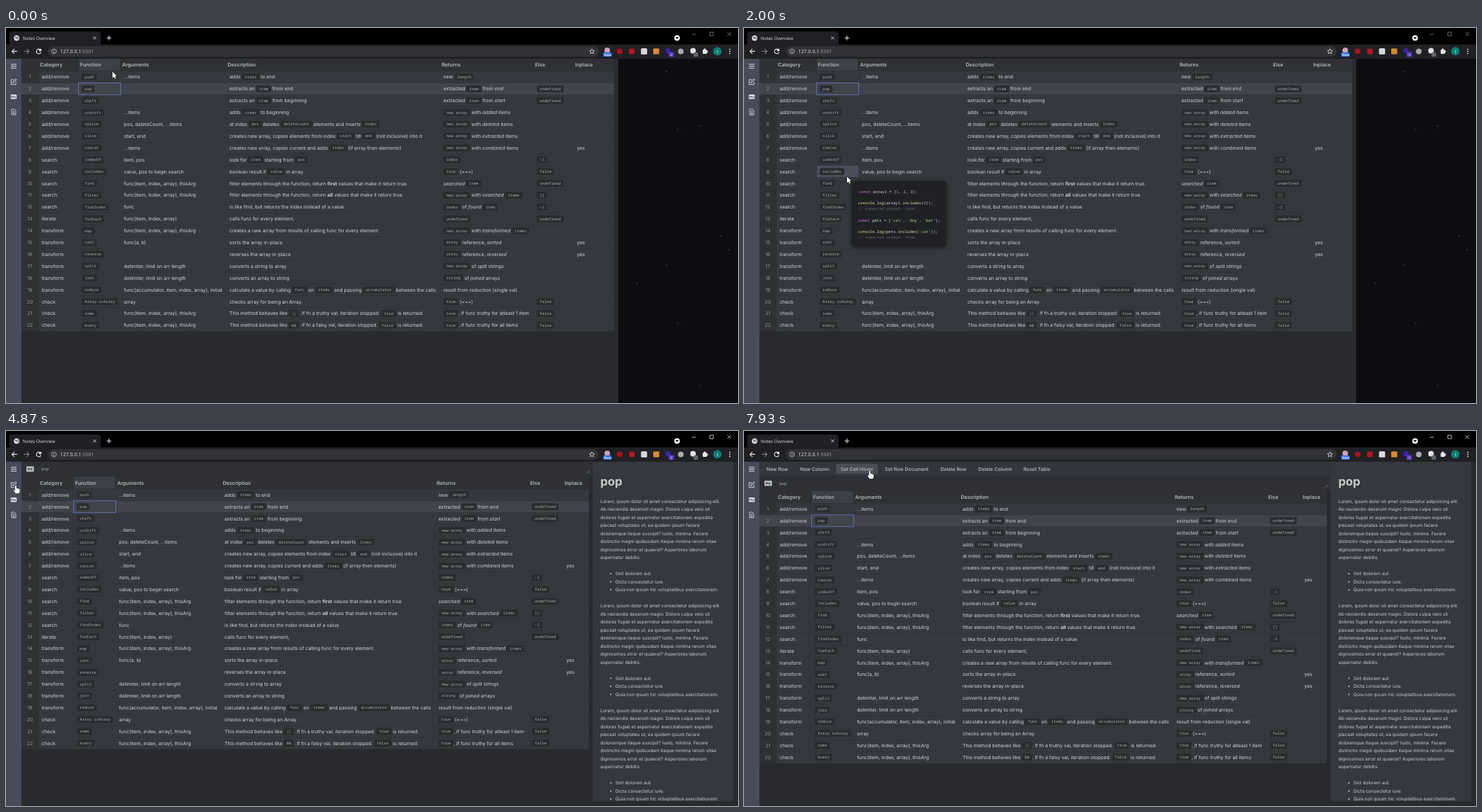
An HTML page with a canvas for the animation above (8 s loop, 1045 by 536 pixels).

```html
<!DOCTYPE html>
<html lang="en">
<head>
<meta charset="utf-8">
<title>Notes Overview</title>
<style>
html, body { margin: 0; width: 100%; height: 100%; overflow: hidden; background: #000; }
canvas { display: block; width: 1045px; height: 536px; }
</style>
</head>
<body>
<canvas id="stage" width="1045" height="536"></canvas>
<script>
const ctx = document.getElementById('stage').getContext('2d');
const LOOP = 8000, FPS = 15, ROW = 16.9, TOP = 44;
const UI = 'Inter, sans-serif', MONO = '"Noto Sans Mono", monospace', BAR = '"Open Sans", sans-serif';
const SIZE = 6.89, CODE = 5.58;

const HEADS = ['Category', 'Function', 'Arguments', 'Description', 'Returns', 'Else', 'Inplace'];
const COLS = [51, 108.3, 168.3, 319, 624.5, 757.8, 815];
// ~chip~  _italic_  *bold*
const ROWS = `add/remove;~push~;...items;adds ~items~ to end;new ~length~
add/remove;~pop~;;extracts an ~item~ from end;extracted ~item~ from _end_;~undefined~
add/remove;~shift~;;extracts an ~item~ from beginning;extracted ~item~ from _start_;~undefined~
add/remove;~unshift~;...items;adds ~items~ to beginning;~new array~ with _added_ items
add/remove;~splice~;pos, deleteCount, ...items;at index ~pos~ deletes ~deleteCount~ elements and inserts ~items~;~new array~ with _deleted_ items
add/remove;~slice~;start, end;creates new array, copies elements from index ~start~ till ~end~ (not inclusive) into it;~new array~ with _extracted_ items
add/remove;~concat~;...items;creates new array, copies current and adds ~items~ (if array then elements);~new array~ with _combined_ items;;yes
search;~indexOf~;item, pos;look for ~item~ starting from ~pos~;~index~;~-1~
search;~includes~;value, pos to begin search;boolean result if ~value~ in array;~true~ (===);~false~
search;~find~;func(item, index, array), thisArg;filter elements through the function, return *first* values that make it return true.;_searched_ ~item~;~undefined~
search;~filter~;func(item, index, array), thisArg;filter elements through the function, return *all* values that make it return true.;~new array~ with _searched_ ~items~;~[]~
search;~findIndex~;func;is like find, but returns the index instead of a value.;~index~ of _found_ ~item~;~-1~
iterate;~forEach~;func(item, index, array);calls func for every element,;~undefined~;~undefined~
transform;~map~;func(item, index, array), thisArg;creates a new array from results of calling func for every element.;~new array~ with _transformed_ ~items~
transform;~sort~;func(a, b);sorts the array in-place;~array~ reference, _sorted_;;yes
transform;~reverse~;;reverses the array in-place;~array~ reference, _reversed_;;yes
transform;~split~;delimiter, limit on arr length;converts a string to array;~new array~ of _split_ strings
transform;~join~;delimiter, limit on arr length;converts an array to string;~string~ of _joined_ arrays
transform;~reduce~;func(accumulator, item, index, array), initial;calculate a value by calling ~func~ on ~items~ and passing ~accumulator~ between the calls;result from reduction (single val)
check;~Array.isArray~;array;checks array for being an Array.;~true~ (===);~false~
check;~some~;func(item, index, array), thisArg;This method behaves like ~||~. If fn a truthy val, iteration stopped. ~true~ is returned.;~true~, if func truthy for atleast 1 item;~false~
check;~every~;func(item, index, array), thisArg;This method behaves like ~&&~. If fn a falsy val, iteration stopped. ~false~ is returned.;~true~, if func truthy for all items;~false~`
  .split('\n').map(r => r.split(';'));

const EXAMPLES = `const animals = ['pigs', 'goats', 'sheep'];

const count = animals.push('cows');
console.log(count);
// expected output: 4
#const plants = ['broccoli', 'cauliflower', 'cabbage', 'kale', 'tomato'];

console.log(plants.pop());
// expected output: "tomato"

console.log(plants);
// expected output: array ["broccoli", "cauliflower", "cabbage", "kale"]
#const array1 = [1, 2, 3];

const firstElement = array1.shift();

console.log(array1);
// expected output: Array [2, 3]

console.log(firstElement);
// expected output: 1
#const array1 = [1, 2, 3];

console.log(array1.unshift(4, 5));
// expected output: 5

console.log(array1);
// expected output: Array [4, 5, 1, 2, 3]
#const months = ['Jan', 'March', 'April', 'June'];
months.splice(1, 0, 'Feb');
// inserts at index 1
console.log(months);
// expected output: Array ["Jan", "Feb", "March", "April", "June"]

months.splice(4, 1, 'May');
// replaces 1 element at index 4
console.log(months);
// expected output: Array ["Jan", "Feb", "March", "April", "May"]
#const animals = ['ant', 'bison', 'camel', 'duck', 'elephant'];

console.log(animals.slice(2));
// expected output: Array ["camel", "duck", "elephant"]

console.log(animals.slice(2, 4));
// expected output: Array ["camel", "duck"]

console.log(animals.slice(1, 5));
// expected output: Array ["bison", "camel", "duck", "elephant"]

console.log(animals.slice(-2));
// expected output: Array ["duck", "elephant"]
#const array1 = ['a', 'b', 'c'];
const array2 = ['d', 'e', 'f'];
const array3 = array1.concat(array2);

console.log(array3);
// expected output: Array ["a", "b", "c", "d", "e", "f"]
#const beasts = ['ant', 'bison', 'camel', 'duck', 'bison'];

console.log(beasts.indexOf('bison'));
// expected output: 1

// start from index 2
console.log(beasts.indexOf('bison', 2));
// expected output: 4

console.log(beasts.indexOf('giraffe'));
// expected output: -1
#const array1 = [1, 2, 3];

console.log(array1.includes(2));
// expected output: true

const pets = ['cat', 'dog', 'bat'];

console.log(pets.includes('cat'));
// expected output: true`.split('\n#').map(s => s.split('\n'));

const LOREM = `Lorem, ipsum dolor sit amet consectetur adipisicing elit.
Ab reiciendis deserunt magni. Dolore culpa vero sit
dolores fugiat et aspernatur exercitationem expedita
placeat voluptates ut, ea quidem ipsum facere
doloremque itaque suscipit? Iusto, minima. Facere
distinctio magni quibusdam itaque minima rerum vitae
dignissimos error et quaerat? Asperiores laborum
aspernatur debitis.`.split('\n');
const LIST = ['Sint dolorem aut.', 'Dicta consectetur iure.', 'Quia non ipsum hic voluptatibus exercitationem.'];

const BUTTONS = [['New Row', 32], ['New Column', 80], ['Set Cell Hover', 138], ['Set Row Document', 201],
  ['Delete Row', 280.5], ['Delete Column', 334.5], ['Reset Table', 399]];

// pointer path: step (1/15 s), x, y
const PATH = [[-1, 153, 55], [0, 152, 62.5], [1, 151, 68], [4, 145, 87], [13, 145, 87], [17, 139, 130], [22, 143, 161],
  [25, 146, 177], [26, 146, 188], [27, 146, 189], [29, 147, 211], [30, 147, 212.5], [33, 143, 207], [38, 143, 207],
  [41, 125, 191], [45, 60, 150], [49, 16.5, 127], [51, 16, 124], [57, 16, 124], [63, 11, 101], [66, 11, 98],
  [70, 14, 81], [73, 14, 78], [82, 14, 78], [88, 95, 122], [89, 121, 124], [90, 122, 124.5], [95, 131, 128],
  [97, 131, 128], [104, 75, 75], [110, 55, 56], [111, 55, 56], [119, 179.5, 57]];
const FOCUS_AT = 52, PANEL_AT = 53, EDITOR_AT = 65, TOOLS_AT = 75;

const STARS = [[943, 62], [990, 140], [959, 145], [1021, 297], [1032, 317], [943, 339], [901, 365], [959, 422], [990, 511]];

function box(x, y, w, h, color, r = 0) {
  ctx.fillStyle = color;
  ctx.beginPath();
  ctx.roundRect(x, y, w, h, r);
  ctx.fill();
}
function dot(x, y, r, color) {
  ctx.fillStyle = color;
  ctx.beginPath();
  ctx.arc(x, y, r, 0, 7);
  ctx.fill();
}
// polylines from "x,y x,y / x,y x,y"
function lines(spec, x, y, color, width = 1) {
  ctx.strokeStyle = color;
  ctx.lineWidth = width;
  ctx.beginPath();
  for (const part of spec.split('/')) {
    part.trim().split(' ').forEach((p, i) => {
      const [a, b] = p.split(',').map(Number);
      ctx[i ? 'lineTo' : 'moveTo'](x + a, y + b);
    });
  }
  ctx.stroke();
}
function text(s, x, y, color, font) {
  ctx.font = font;
  ctx.fillStyle = color;
  ctx.fillText(s, x, y);
  return ctx.measureText(s).width;
}

function rich(s, x, y) {
  for (const part of s.split(/(~[^~]+~|_[^_]+_|\*[^*]+\*)/)) {
    if (!part) continue;
    const body = part.slice(1, -1);
    if (part[0] === '~') {
      ctx.font = `${CODE}px ${MONO}`;
      const w = ctx.measureText(body).width + 8;
      box(x, y - 4.9, w, 9.8, '#2a2c30', 1.6);
      text(body, x + 4, y + 1.9, '#a6a9ae', ctx.font);
      x += w;
    } else {
      const style = part[0] === '_' ? 'italic ' : part[0] === '*' ? 'bold ' : '';
      x += text(style ? body : part, x, y + 2.5, '#d2d4d7', `${style}${SIZE}px ${UI}`);
    }
  }
}

function pointer(f) {
  let i = 1;
  while (i < PATH.length - 1 && PATH[i][0] < f) i++;
  const [a, b] = [PATH[i - 1], PATH[i]];
  const k = Math.min(1, Math.max(0, (f - a[0]) / (b[0] - a[0])));
  return [a[1] + (b[1] - a[1]) * k, a[2] + (b[2] - a[2]) * k];
}

function layout(f) {
  const panel = f >= PANEL_AT;
  return {
    panel, editor: f >= EDITOR_AT, tools: f >= TOOLS_AT,
    dy: f >= TOOLS_AT ? 41.4 : f >= EDITOR_AT ? 21.3 : 0,
    right: panel ? 832 : 868,
    shift: c => !panel || !c ? 0 : c === 6 ? -15 : -7
  };
}

// row under the slightly delayed pointer, within the Function column
function hovered(f) {
  const [x, y] = pointer(f - 0.25), L = layout(f), left = 103.5 + L.shift(1);
  const row = Math.floor((y - 61.5 - L.dy) / ROW);
  return x > left && x < left + 60.5 && row >= 0 && row < ROWS.length ? row : -1;
}

function table(L, hover) {
  const top = TOP + L.dy, first = top + 17.5, fx = 103.5 + L.shift(1);
  box(22, top, L.right - 22, 17.5, '#2f3136');
  box(fx + 0.5, top, 58.5, 17.5, '#3b3f46');
  HEADS.forEach((h, c) =>
    text(h, COLS[c] - 2.6 + L.shift(c), top + 11.4, '#b4b7bb', `600 7.2px ${UI}`));
  box(22, first, 25, ROW * ROWS.length, '#2f3136');
  box(47, first, L.right - 47, ROW * ROWS.length, '#35383e');
  ROWS.forEach((row, i) => {
    const y = first + i * ROW, mid = y + ROW / 2;
    if (i === 1) box(22, y, L.right - 22, ROW, '#40444c');
    box(22, y, L.right - 22, 0.5, '#2d2f34');
    if (i === hover) box(fx + 0.5, y, 59.5, ROW, '#4a4e5a');
    ctx.textAlign = 'center';
    text(i + 1, 34, mid + 2.5, '#94979c', `${SIZE}px ${UI}`);
    ctx.textAlign = 'left';
    row.forEach((cell, c) => rich(cell, COLS[c] + L.shift(c), mid));
  });
  ctx.strokeStyle = '#6478b8';
  ctx.lineWidth = 0.9;
  ctx.strokeRect(fx, first + ROW + 0.1, 60.2, ROW);
}

function codeLine(s, x, y) {
  ctx.font = `${CODE}px ${MONO}`;
  const cw = ctx.measureText('0').width;
  for (const m of s.matchAll(/\/\/.*|'[^']*'|\w+|[^\w'/]+/g)) {
    const t = m[0];
    const next = s[m.index + t.length];
    const color = t.startsWith('//') ? '#62666d' : t[0] === "'" ? '#a5d184' : t === 'const' ? '#cf83dd'
      : /^\d/.test(t) ? '#dcb184' : t === 'console' || /\w/.test(t) && next === '(' ? '#e0dca0' : '#d3d7d0';
    text(t, x + m.index * cw, y, color, `${t.startsWith('//') ? 'italic ' : ''}${CODE}px ${MONO}`);
  }
}

function popup(code, x, y) {
  const chars = Math.max(...code.map(s => s.length));
  ctx.save();
  ctx.shadowColor = 'rgba(0,0,0,.6)';
  ctx.shadowBlur = 6;
  ctx.shadowOffsetY = 1;
  box(x, y, chars * 3.35 + 17, code.length * 8.2 + 19.5, '#1f2124', 3.5);
  ctx.restore();
  code.forEach((s, i) => codeLine(s, x + (i ? 8.5 : 9.5), y + 16.6 + i * 8.2));
}

function browser(focus) {
  const white = '#e6e7e9', dim = focus ? white : '#85878a';
  box(0, 0, 1045, 24, '#000');
  box(4.5, 5, 130.5, 24, '#202124', 4);
  box(0, 23.5, 1045, 20.5, '#202124');
  box(60, 26, 786, 15, '#313236', 7.5);
  dot(15.2, 14.3, 3.9, white);
  lines('-2.5,-1.5 0,-.5 -1,1.5 / 1,-2.5 2.5,0 1,2', 15.2, 14.3, '#202124', 1);
  text('Notes Overview', 24, 16.7, white, `6.3px ${BAR}`);
  lines('-2,-2 2,2 / 2,-2 -2,2', 126.5, 14.3, white, 0.9);
  lines('-3.3,0 3.3,0 / 0,-3.3 0,3.3', 147, 14.3, white, 1.1);
  dot(958, 14.2, 4, '#f1f1f1');
  ctx.fillStyle = '#111';
  ctx.beginPath();
  ctx.moveTo(955.6, 13); ctx.lineTo(960.4, 13); ctx.lineTo(958, 16);
  ctx.fill();
  lines('-2.7,.5 2.7,.5', 982, 8.5, dim, 0.8);
  lines('-2.5,-2.5 2.5,-2.5 2.5,2.5 -2.5,2.5 -2.5,-2.5', 1007.3, 8.5, dim, 0.8);
  lines('-2.6,-2.6 2.6,2.6 / 2.6,-2.6 -2.6,2.6', 1032.5, 8.5, dim, 0.8);

  lines('3.8,0 -3.5,0 / 0,-3.5 -3.5,0 0,3.5', 12, 33.4, white, 1.1);
  lines('-3.8,0 3.5,0 / 0,-3.5 3.5,0 0,3.5', 29.5, 33.4, '#7b7d80', 1.1);
  ctx.strokeStyle = white;
  ctx.lineWidth = 1.1;
  ctx.beginPath();
  ctx.arc(46.8, 33.4, 3.3, 0.3, 5.5);
  ctx.stroke();
  box(47.2, 29.8, 3.3, 3.3, white);
  ctx.lineWidth = 0.7;
  ctx.beginPath();
  ctx.arc(68.5, 33.4, 3.3, 0, 7);
  ctx.stroke();
  lines('0,-1.8 0,-1 / 0,-.4 0,1.8', 68.5, 33.4, white, 0.8);
  const w = text('127.0.0.1', 77.5, 36, white, `7.1px ${BAR}`);
  text(':5501', 77.5 + w, 36, '#a0a2a5', `7.1px ${BAR}`);
  lines('0,-3.7 1.1,-1.2 3.7,-1 1.7,.8 2.3,3.3 0,1.9 -2.3,3.3 -1.7,.8 -3.7,-1 -1.1,-1.2 0,-3.7', 836.5, 33.5, white, 0.8);

  dot(858.3, 32, 4, '#c9a3b8');
  box(852.5, 35, 12, 6, '#2f6fde', 1);
  text('New', 853.7, 39.9, '#fff', `600 4.9px ${BAR}`);
  dot(876, 33.4, 4.2, '#a51420');
  box(889.5, 29.5, 7.8, 7.8, '#b81623', 1);
  box(906.5, 29, 8.8, 8.8, '#d8d8d8', 1.5);
  box(924, 29.3, 8.5, 8.2, '#d58a32', 1);
  dot(945, 32.5, 3.8, '#3d22a8');
  box(946, 34.5, 7.5, 6.8, '#5a3bc4', 1);
  text('3', 948.2, 39.9, '#fff', `5px ${BAR}`);
  dot(963.3, 33.4, 4, '#a9abad');
  dot(980.8, 32.5, 4, '#e4e4e4');
  box(981.5, 35, 6.5, 6, '#5e6570', 1);
  box(994.6, 31, 6, 6, white, 0.8);
  dot(997.4, 30.6, 1.4, white);
  dot(1000.8, 33.8, 1.4, white);
  dot(1015.5, 33.3, 6, '#0b7f72');
  text('t', 1014.4, 35.6, '#fff', `6.5px ${BAR}`);
  for (const k of [-1, 0, 1]) dot(1033.3, 33.4 + k * 3, 0.9, white);
}

function markIcon(x, y, w, h, color, ink) {
  box(x - w / 2, y - h / 2, w, h, color, 1);
  lines('-3,1.6 -3,-1.4 -1.7,.2 -.4,-1.4 -.4,1.6 / 2,-1.6 2,1.4 / .8,.3 2,1.6 3.2,.3', x, y, ink, 0.8);
}

function sidebar() {
  const c = '#e3e4e8';
  box(0, TOP, 22, 492, '#484b58');
  lines('-4,-2.7 4,-2.7 / -4,0 4,0 / -4,2.7 4,2.7', 11, 54.6, c, 1);
  lines('0,-3.2 -3.7,-3.2 -3.7,3.8 3.2,3.8 3.2,.5 / -1.3,1.4 -1,-.4 3,-4.3 4.2,-3.1 .3,.9 -1.3,1.4', 11, 77, c, 0.9);
  markIcon(11, 98.3, 8.4, 6.4, c, '#484b58');
  lines('-3,-4 1,-4 3,-2 3,4 -3,4 -3,-4 / -1.4,-.8 1.4,-.8 / -1.4,.9 1.4,.9 / -1.4,2.4 1.4,2.4', 11, 120, c, 0.8);
}

function bars(L, x, y) {
  if (L.editor) {
    const top = L.tools ? 64.3 : TOP;
    box(22, top, 815, 21.2, '#2e3035');
    markIcon(34.5, top + 10.4, 10.8, 7.6, '#b9bbbf', '#2e3035');
    text('`pop`', 47.3, top + 12.2, '#a9acb0', `5.8px ${MONO}`);
    lines('-4,0 0,-4 / -2,0 0,-2', 833, top + 16.5, '#96999d', 0.6);
  }
  if (L.tools) {
    box(22, TOP, 815, 20.3, '#33363d');
    for (const [label, bx] of BUTTONS) {
      ctx.font = `500 ${SIZE}px ${UI}`;
      const w = ctx.measureText(label).width + 13;
      if (y > 47 && y < 61 && x > bx - 6.5 && x < bx - 6.5 + w) box(bx - 6.5, 47, w, 14, '#4a4d55', 1.5);
      text(label, bx, 56.5, '#bfc1c5', ctx.font);
    }
  }
}

function notes() {
  box(837.5, TOP, 201, 485, '#35383e');
  ctx.save();
  ctx.beginPath();
  ctx.rect(837, TOP, 202, 485);
  ctx.clip();
  text('pop', 848.5, 78.3, '#c8cacd', `bold 16.8px ${UI}`);
  const font = `6.5px ${UI}`, color = '#c9cbce';
  for (let g = 0; g < 3; g++) {
    const y = 102.8 + g * 149.5;
    LOREM.forEach((s, i) => text(s, 848.5, y + i * 11.5, color, font));
    LIST.forEach((s, i) => {
      const ly = y + 103.5 + i * 11.5;
      dot(863.5, ly - 2.2, 1, color);
      text(s, 870, ly, color, font);
    });
  }
  ctx.restore();
}

const ARROW = new Path2D('M0 0V8.7L2 6.9L3.4 9.9L4.8 9.3L3.5 6.3H6.2Z');
const HAND = new Path2D('M-1 1Q0-.8 1 1V4Q2 3.4 2.8 4.4Q3.8 3.8 4.4 4.8Q5.6 4.5 5.6 5.8V8.2Q5.4 9.8 4.6 11.2H-.4Q-1.4 9.6-3.2 7Q-3.2 5.6-1 7Z');
function cursor(x, y, hand) {
  const shape = hand ? HAND : ARROW;
  ctx.save();
  ctx.translate(x, y);
  ctx.lineWidth = 1;
  ctx.lineJoin = 'round';
  ctx.strokeStyle = '#111';
  ctx.stroke(shape);
  ctx.fillStyle = '#fff';
  ctx.fill(shape);
  ctx.restore();
}

function draw(f) {
  const L = layout(f), [x, y] = pointer(f), hover = hovered(f);
  ctx.textRendering = 'geometricPrecision';
  box(0, 0, 1045, 536, '#0c0d10');
  if (!L.panel) for (const [sx, sy] of STARS) dot(sx, sy, 0.7, '#6e7074');
  box(22, TOP, L.panel ? 1023 : 852, 492, '#282a2e');
  table(L, hover);
  bars(L, x, y);
  if (L.panel) notes();
  sidebar();
  browser(f >= FOCUS_AT);
  if (hover >= 0 && hover === hovered(f - 1) && EXAMPLES[hover]) {
    const [px, py] = pointer(f - 0.25);
    popup(EXAMPLES[hover], px + 7.3, py + 6.8);
  }
  cursor(x, y, x < 22 || (L.tools && y > 47 && y < 61));
}

const start = performance.now();
function tick() {
  const t = (performance.now() - start) % LOOP;
  draw(Math.floor(t * FPS / 1000 + 0.06) % (LOOP * FPS / 1000));
  requestAnimationFrame(tick);
}
tick();
</script>
</body>
</html>
```
